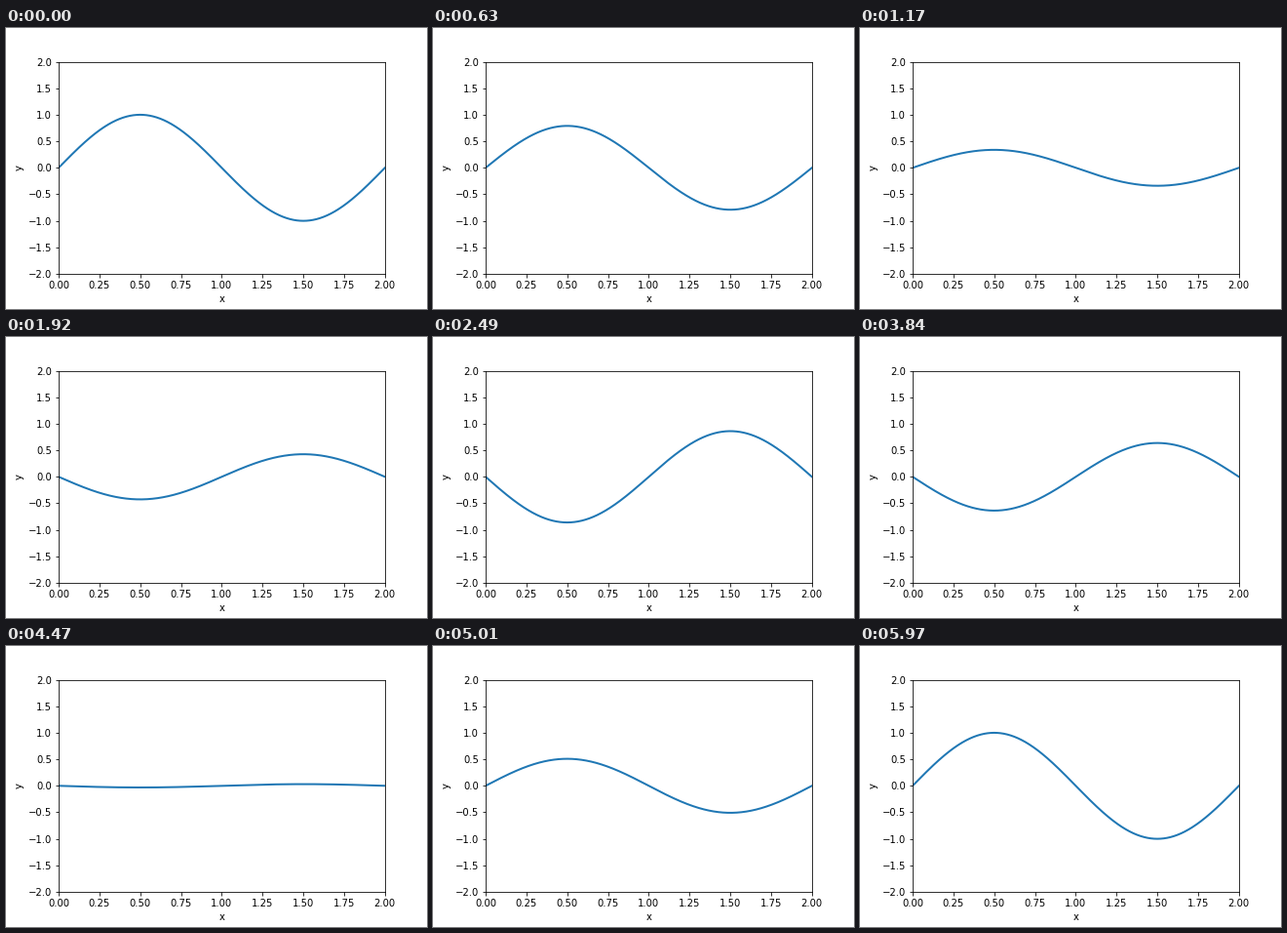
A matplotlib script for the animation above (6 s loop, 432 by 288 pixels).

```python
import numpy as np
import matplotlib.pyplot as plt
from matplotlib.animation import FuncAnimation

FRAMES = 200
INTERVAL = 30  # ms

plt.rcParams["font.family"] = "DejaVu Sans"

fig, ax = plt.subplots(figsize=(6, 4), dpi=72)
fig.subplots_adjust(left=0.125, right=0.9, bottom=0.125, top=0.88)
ax.set_xlim(0, 2)
ax.set_ylim(-2, 2)
ax.set_xlabel("x")
ax.set_ylabel("y")

x = np.linspace(0, 2, 1000)
mode = np.sin(np.pi * x)
line, = ax.plot(x, mode, color="#1f77b4", lw=2)


def update(i):
    """Standing wave: one full oscillation per loop."""
    line.set_ydata(mode * np.cos(2 * np.pi * i / FRAMES))
    return line,


anim = FuncAnimation(fig, update, frames=FRAMES, interval=INTERVAL,
                     repeat=True, repeat_delay=0, blit=False)
plt.show()
```
